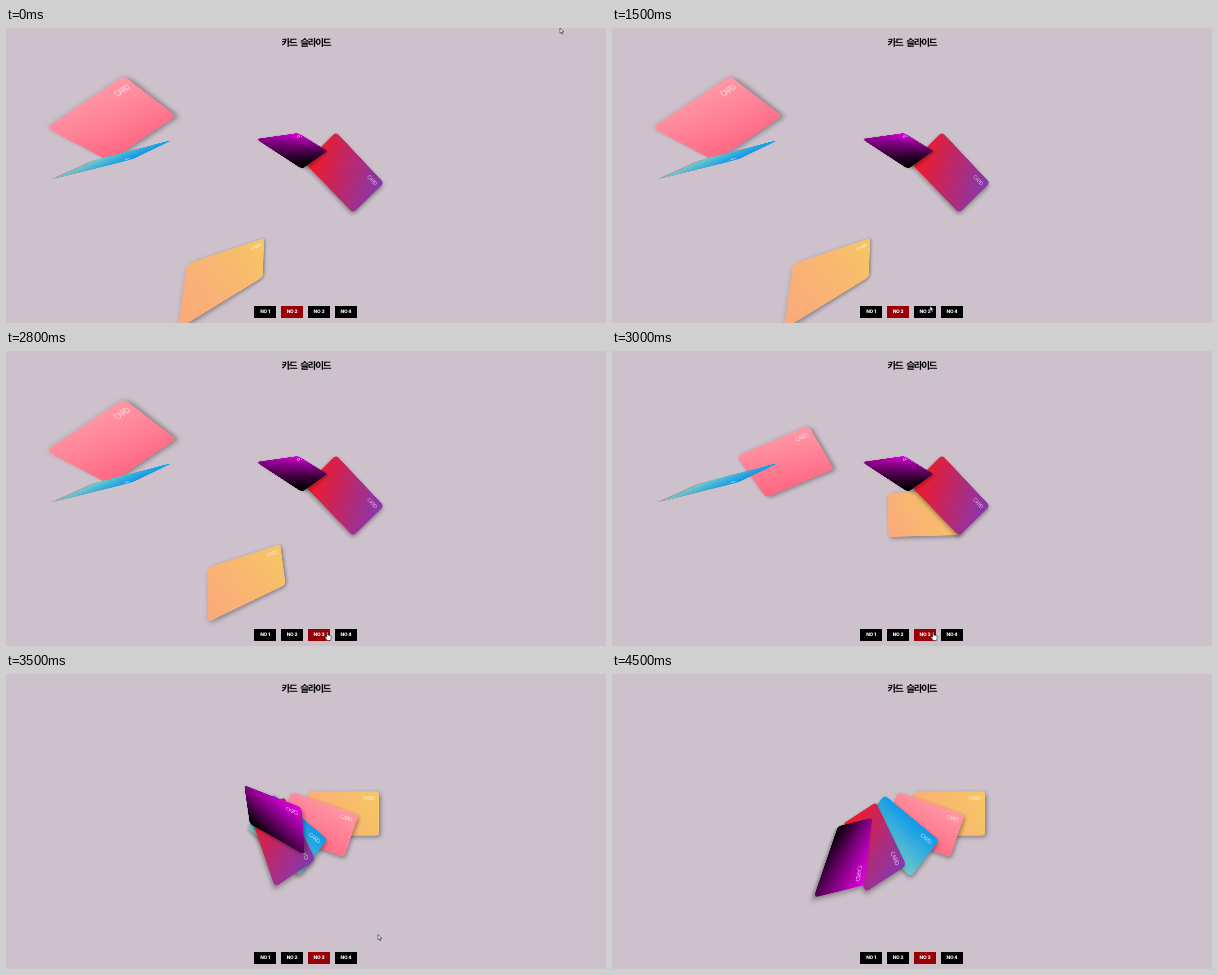
Write an HTML page that moves like this. It is 600 px wide and 295 px high and loops after 5.3 s.

```html
<!DOCTYPE html>
<html>
<head>
<meta charset="utf-8">
<title>Card slide</title>
<style>
  html, body { margin: 0; width: 100%; height: 100%; overflow: hidden; background: #cdc1cc; }
  #stage {
    position: relative; width: 600px; height: 295px; overflow: hidden; background: #cdc1cc;
    text-rendering: geometricPrecision;
  }
  h1 {
    position: absolute; left: 0; top: 7px; width: 600px; margin: 0; text-align: center;
    font: 800 9.6px/14px "Noto Sans CJK KR", "Noto Sans CJK", sans-serif;
    letter-spacing: -1.25px; word-spacing: 2.5px; color: #000;
  }
  .card {
    position: absolute; left: 0; top: 0; width: 142px; height: 86px; border-radius: 7px;
    transform-origin: 0 0; box-shadow: 3px 3px 8px rgba(0, 0, 0, .38);
  }
  .card span {
    position: absolute; right: 9px; top: 7px; color: rgba(255, 255, 255, .75);
    font: 10.5px/14px "Open Sans", sans-serif; letter-spacing: -.8px;
  }
  .btn {
    position: absolute; top: 278px; width: 22px; height: 12px; text-align: center; color: #fff;
    font: 800 4.8px/12.4px Inter, sans-serif; letter-spacing: -.2px; background: #000;
  }
  svg { position: absolute; left: 0; top: 0; overflow: visible; }
  path { fill: #fff; stroke: #222; stroke-width: .6; stroke-linejoin: round; }
</style>
</head>
<body>
<div id="stage">
  <h1>카드 슬라이드</h1>
  <svg id="cursor" width="10" height="12">
    <path id="arrow" d="M0 0V5.2L1.2 4.1L2.1 6.1L3 5.7L2.1 3.8H3.7Z"/>
    <path id="hand" d="M0 .6Q.6-.4 1.2 .6V3L4.2 3.7Q4.8 4 4.6 5.2L4 8.6H.6L-1.6 5.4Q-1.4 4.4 0 5.2Z"/>
  </svg>
</div>
<script>
const LOOP = 5300, STEP = 100, W = 142, H = 86;
const FIRST = 2710, STAGGER = 162, MOVE = 600;
const stage = document.getElementById('stage');
const cursor = document.getElementById('cursor');
const arrow = document.getElementById('arrow');
const hand = document.getElementById('hand');

const clamp = x => Math.max(0, Math.min(1, x));
const mix = (a, b, k) => a + (b - a) * k;
const ramp = (t, from, to) => clamp((t - from) / (to - from));
const axis = deg => [Math.cos(deg * Math.PI / 180), Math.sin(deg * Math.PI / 180)];
const smoother = k => k ** 3 * (10 - 15 * k + 6 * k * k);
const easeOut = k => 1 - (1 - k) ** 3;

// cubic-bezier(.25, .1, .25, 1), solved by bisection
function ease(x) {
  const curve = (s, p, q) => 3 * (1 - s) ** 2 * s * p + 3 * (1 - s) * s * s * q + s ** 3;
  let lo = 0, hi = 1;
  for (let n = 0; n < 20; n++) {
    const mid = (lo + hi) / 2;
    if (curve(mid, .25, .25) < x) lo = mid; else hi = mid;
  }
  return curve(hi, .1, 1);
}

// Corners run top left, top right, bottom right, bottom left.
const SIGNS = [[-1, -1], [1, -1], [1, 1], [-1, 1]];

// Resting place in the fan: each card turns, leans and tapers more than the last.
function fan(i) {
  const [ux, uy] = axis(19 * i + .42 * i ** 3), [vx, vy] = axis(19 * i + 90);
  const taper = .0125 * i * i;
  return SIGNS.map(([sx, sy]) => {
    const a = sx * 35.5, b = sy * 22 * (1 + sx * taper);
    return [337.5 - 25.6 * i + a * ux + b * vx, 139.5 + 10.8 * i + a * uy + b * vy];
  });
}

// Splits a quad into centre, angle of its top edge, and shape in that frame.
function frame(quad) {
  const mean = n => quad.reduce((sum, p) => sum + p[n], 0) / 4;
  const x = mean(0), y = mean(1);
  const angle = Math.atan2(quad[1][1] - quad[0][1], quad[1][0] - quad[0][0]);
  const c = Math.cos(angle), s = Math.sin(angle);
  const shape = quad.map(([px, py]) => [(px - x) * c + (py - y) * s, (py - y) * c - (px - x) * s]);
  return { x, y, angle, shape };
}

// The card flattens first, travels, and turns mostly midway.
function blend(a, b, k) {
  const x = mix(a.x, b.x, k), y = mix(a.y, b.y, k), angle = mix(a.angle, b.angle, smoother(k));
  const c = Math.cos(angle), s = Math.sin(angle), flat = easeOut(k);
  return a.shape.map(([px, py], n) => {
    const u = mix(px, b.shape[n][0], flat), v = mix(py, b.shape[n][1], flat);
    return [x + u * c - v * s, y + u * s + v * c];
  });
}

// Perspective matrix that lays a W x H element onto four corners.
function project([[x0, y0], [x1, y1], [x2, y2], [x3, y3]]) {
  const dx1 = x1 - x2, dx2 = x3 - x2, sx = x0 - x1 + x2 - x3;
  const dy1 = y1 - y2, dy2 = y3 - y2, sy = y0 - y1 + y2 - y3;
  const det = dx1 * dy2 - dx2 * dy1;
  const g = (sx * dy2 - dx2 * sy) / det, h = (dx1 * sy - sx * dy1) / det;
  const m = [
    (x1 - x0 + g * x1) / W, (y1 - y0 + g * y1) / W, 0, g / W,
    (x3 - x0 + h * x3) / H, (y3 - y0 + h * y3) / H, 0, h / H,
    0, 0, 1, 0, x0, y0, 0, 1
  ];
  return `matrix3d(${m.map(v => v.toFixed(7))})`;
}

function add(className, html) {
  const el = document.createElement('div');
  el.className = className;
  el.innerHTML = html;
  return stage.insertBefore(el, cursor);
}

// Back card first: fill and scattered corners.
const cards = [
  ['60deg, #fba97c, #f5c862', [[181, 236], [258, 210], [257, 249], [172, 301]]],
  ['190deg, #ff98a6, #ff6580', [[40, 100], [118, 48], [170, 88], [103, 133]]],
  ['182deg, #0b98ec, #74cbc8', [[166, 112], [127, 131], [50, 150], [92, 131]]],
  ['60deg, #ee1b2c 8%, #8338b2', [[330, 104], [378, 155], [347, 185], [299, 135]]],
  ['20deg, #000 5%, #e600e6', [[250, 111], [292, 105], [321, 123], [296, 141]]]
].map(([fill, corners], i) => {
  const el = add('card', '<span>CARD</span>');
  el.style.background = `linear-gradient(${fill})`;
  return { el, from: frame(corners), to: frame(fan(i)), start: FIRST + STAGGER * i };
});

const buttons = [1, 2, 3, 4].map(n => {
  const el = add('btn', 'NO ' + n);
  el.style.left = 221 + 27 * n + 'px';
  return el;
});

// Cursor stops: time, x, y.
const trail = [
  [0, 554, 0], [600, 367, 208], [1200, 326, 267], [1500, 318, 278],
  [1600, 320.6, 281], [3400, 320.6, 281], [3500, 372, 260.5], [4000, 558, 27], [4500, 582, -12]
];

const paint = (el, k) => { el.style.background = `rgb(${151 * k}, 0, ${5 * k})`; };

function draw(t) {
  for (const { el, from, to, start } of cards) {
    el.style.transform = project(blend(from, to, ease(ramp(t, start, start + MOVE))));
  }
  paint(buttons[1], 1 - ramp(t, 2400, 2700));
  paint(buttons[2], ramp(t, 1550, 2000));

  const next = Math.max(1, trail.findIndex(p => p[0] >= t));
  const [a, b] = t < 4500 ? [trail[next - 1], trail[next]] : trail.slice(-2);
  const k = ramp(t, a[0], b[0]);
  cursor.style.transform = `translate(${mix(a[1], b[1], k)}px, ${mix(a[2], b[2], k)}px)`;
  const over = t >= 1600 && t <= 3400;
  hand.style.display = over ? '' : 'none';
  arrow.style.display = over ? 'none' : '';
}

const begin = performance.now();
function tick() {
  const t = (performance.now() - begin) % LOOP;
  draw(Math.floor(t / STEP) * STEP);
  requestAnimationFrame(tick);
}
tick();
</script>
</body>
</html>
```
